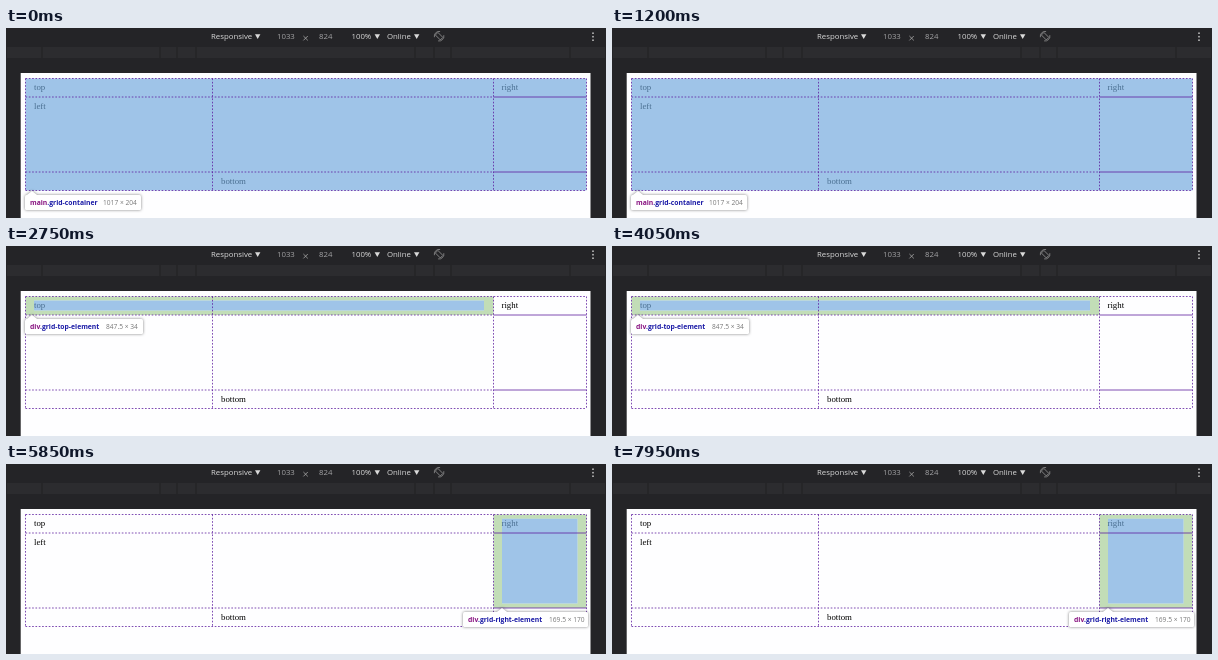
Animation, 600 px wide and 190 px high, one loop 8000 ms. Source, as an HTML page:

```html
<!DOCTYPE html>
<html lang="en">
<head>
<meta charset="utf-8">
<title>Grid inspector</title>
<style>
  html, body { margin: 0; width: 100%; height: 100%; overflow: hidden; background: #242427; }
  svg { display: block; width: 600px; height: 190px; }
  text { white-space: pre; }
  .bar { font: 500 7.8px "Open Sans", sans-serif; fill: #dadada; }
  .dim { font-weight: 400; fill: #a2a2a4; }
  .page { font: 8.8px "Liberation Serif", serif; fill: #000; }
  .name { font: 700 6.8px "Open Sans", sans-serif; fill: #1a1aa6; }
  .tag { fill: #881280; }
  .size { font: 6.65px "Open Sans", sans-serif; fill: #777; }
  .content { fill: rgba(111, 168, 220, .66); }
  .padding { fill: rgba(147, 196, 125, .55); }
  .grid { fill: none; stroke: #5c1a9e; stroke-opacity: .78; }
  .dashed { stroke-dasharray: 1.66; }
  .tip { fill: #fff; filter: drop-shadow(0 .8px 1.5px rgba(0, 0, 0, .5)); }
</style>
</head>
<body>
<svg id="stage" viewBox="0 0 600 190"></svg>
<script>
const LOOP = 8000;
const stage = document.getElementById('stage');

const rect = (x, y, w, h, attrs) => `<rect x="${x}" y="${y}" width="${w}" height="${h}" ${attrs}/>`;
const text = (x, y, cls, s) => `<text x="${x}" y="${y}" class="${cls}">${s}</text>`;
const arrow = x => `<path d="M${x} 6.3h5.4l-2.7 4.8z" fill="#dadada"/>`;

// Each highlight runs from its start until the next one begins.
const states = [
  { start: 0, box: [19.5, 50.5, 561, 112], inset: null,
    tip: { x: 19, y: 167, w: 116, point: 26, tag: 'main', cls: '.grid-container', size: '1017 × 204', sizeX: 97 } },
  { start: 2750, box: [19.5, 50.5, 468, 18.5], inset: [28, 54.5, 450, 10],
    tip: { x: 19, y: 73, w: 118, point: 26, tag: 'div', cls: '.grid-top-element', size: '847.5 × 34', sizeX: 100 } },
  { start: 5850, box: [487.5, 50.5, 93, 93.5], inset: [496, 54.7, 75.5, 84.8],
    tip: { x: 457, y: 148, w: 125, point: 496, tag: 'div', cls: '.grid-right-element', size: '169.5 × 170', sizeX: 543 } }
];

function toolbar() {
  const ticks = [36, 154, 171, 190, 409, 428, 445, 564];
  return rect(0, 0, 600, 190, 'fill="#242427"')
    + text(205, 11.3, 'bar', 'Responsive') + arrow(249)
    + text(271, 11.3, 'bar dim', '1033')
    + '<path d="M297.4 8l4.4 4.4m0-4.4l-4.4 4.4" stroke="#aaa" stroke-width=".8"/>'
    + text(313, 11.3, 'bar dim', '824')
    + `<g style="font-size:7.5px">${text(345.5, 11.3, 'bar', '100%')}</g>` + arrow(368.6)
    + text(381, 11.3, 'bar', 'Online') + arrow(408)
    + `<g fill="none" stroke="#a0a0a0" stroke-width=".7">
         <rect x="431.3" y="4.7" width="3.6" height="7" transform="rotate(-45 433.1 8.2)"/>
         <path d="M428.4 9.2a4.8 4.8 0 0 1 5.7-5.7M437.8 7.2a4.8 4.8 0 0 1-5.7 5.7"/></g>`
    + [5.2, 8.7, 12.2].map(y => `<circle cx="587" cy="${y}" r=".9" fill="#bbb"/>`).join('')
    + rect(1, 19, 598, 11, 'fill="#2c2c2f"')
    + ticks.map(x => rect(x - .5, 19, 1, 11, 'fill="#202022"')).join('');
}

function page() {
  return rect(14.7, 45, 569.8, 145, 'fill="#fefeff"')
    + text(28, 62.2, 'page', 'top') + text(495.5, 62.2, 'page', 'right')
    + text(28, 81, 'page', 'left') + text(215, 156.2, 'page', 'bottom');
}

function highlight({ box, inset }) {
  const [x, y, w, h] = box;
  if (!inset) return rect(x, y, w, h, 'class="content"');
  const [ix, iy, iw, ih] = inset;
  return `<path class="padding" fill-rule="evenodd" d="M${x} ${y}h${w}v${h}h${-w}z M${ix} ${iy}h${iw}v${ih}h${-iw}z"/>`
    + rect(ix, iy, iw, ih, 'class="content"');
}

function tooltip({ x, y, w, point, tag, cls, size, sizeX }) {
  return `<g class="tip">${rect(x, y, w, 15, 'rx="1.5"')}<path d="M${point - 5.5} ${y + .3}l5.5-4.3 5.5 4.3z"/></g>`
    + `<text x="${x + 5}" y="${y + 9.9}" class="name"><tspan class="tag">${tag}</tspan>${cls}</text>`
    + text(sizeX, y + 9.9, 'size', size);
}

const gridLines = `<g class="grid">
  <path class="dashed" d="M19.5 50.5H580.5M19.5 69H487.5M19.5 144H487.5M19.5 162.5H580.5
    M19.5 50.5V162.5M206.5 50.5V162.5M487.5 50.5V162.5M580.5 50.5V162.5"/>
  <path d="M487.5 69H580.5M487.5 144H580.5"/></g>`;

stage.innerHTML = toolbar() + page()
  + states.map(s => `<g class="state">${highlight(s)}${gridLines}${tooltip(s.tip)}</g>`).join('');

const groups = [...stage.querySelectorAll('.state')];

function draw(now) {
  const t = now % LOOP;
  const active = states.filter(s => s.start <= t).length - 1;
  groups.forEach((g, i) => { g.style.display = i === active ? '' : 'none'; });
  requestAnimationFrame(draw);
}
draw(0);
</script>
</body>
</html>
```
